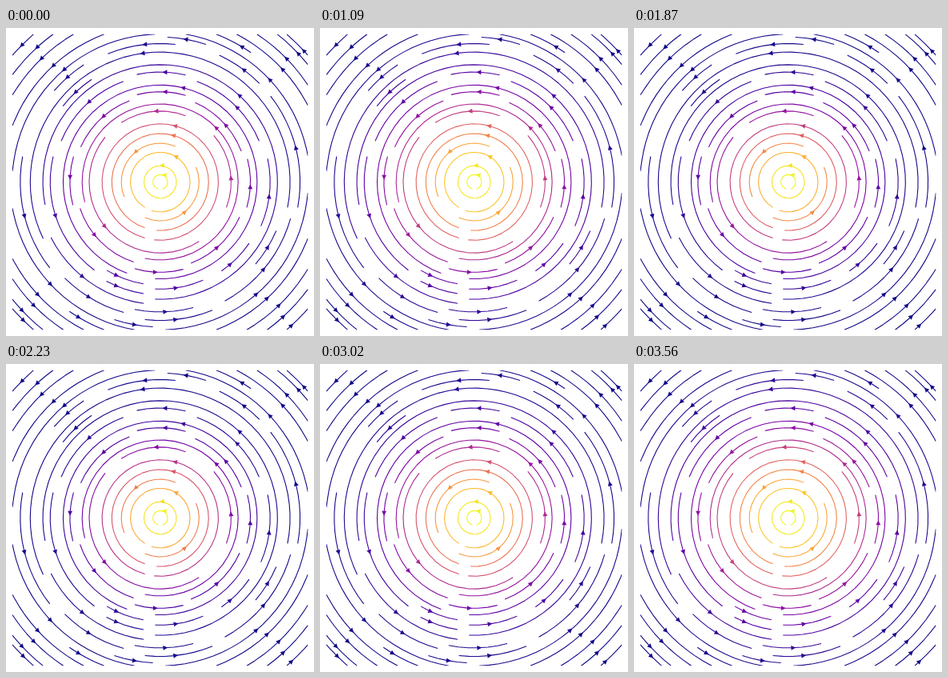
Animation, 385 px wide and 385 px high, one loop 3620 ms. Source, as an HTML page with a canvas:

```html
<!DOCTYPE html>
<html>
<head>
<meta charset="utf-8">
<title>Vortex streamlines</title>
<style>
html, body { margin: 0; width: 100%; height: 100%; overflow: hidden; background: #fff; }
canvas { display: block; }
</style>
</head>
<body>
<canvas id="stage" width="385" height="385"></canvas>
<script>
const ctx = document.getElementById('stage').getContext('2d');
const LAST = 29, MID = LAST / 2;          // streamline mask has 30 x 30 cells
const LEFT = 8, TOP = 7.8, SIZE = 369.4, SCALE = SIZE / LAST;
const MAX_STEP = 1 / 30, MAX_ERROR = 0.003, MIN_LENGTH = 0.1, MAX_LENGTH = 2;
const LOOP = 3620;
const PLASMA = ['0d0887', '41049d', '6a00a8', '8f0da4', 'b12a90', 'cc4778',
  'e16462', 'f2844b', 'fca636', 'fcce25', 'f0f921']
  .map(hex => [0, 2, 4].map(i => parseInt(hex.slice(i, i + 2), 16)));

const taken = new Set();
const cellOf = (x, y) => Math.round(y) * 30 + Math.round(x);
const inside = (x, y) => x >= 0 && x <= LAST && y >= 0 && y <= LAST;

function direction(x, y, sign) {
  const dx = x - MID, dy = y - MID, r = Math.hypot(dx, dy);
  return [-dy / r * sign, dx / r * sign];
}

// Distance, in axes widths, to the border along one axis.
function reach(pos, slope) {
  if (!slope) return Infinity;
  return (slope < 0 ? pos / -slope : (LAST - pos) / slope) / LAST;
}

// Adaptive Heun integration until a taken cell or the border is met.
function walk(x, y, sign, cells) {
  const points = [];
  let step = MAX_STEP, length = 0, current = cellOf(x, y);
  for (;;) {
    points.push([x, y]);
    const [ax, ay] = direction(x, y, sign);
    const px = x + step * LAST * ax, py = y + step * LAST * ay;
    if (!inside(px, py)) {
      const rest = Math.min(reach(x, ax), reach(y, ay));
      points.push([x + rest * LAST * ax, y + rest * LAST * ay]);
      length += rest;
      break;
    }
    const [bx, by] = direction(px, py, sign);
    const error = step / 2 * Math.hypot(bx - ax, by - ay);
    if (error < MAX_ERROR) {
      x += step * LAST * (ax + bx) / 2;
      y += step * LAST * (ay + by) / 2;
      if (!inside(x, y)) break;
      const cell = cellOf(x, y);
      if (cell !== current) {
        if (taken.has(cell)) break;
        taken.add(cell);
        cells.push(cell);
        current = cell;
      }
      if (length + step > MAX_LENGTH) break;
      length += step;
    }
    step = error ? Math.min(MAX_STEP, 0.85 * step * Math.sqrt(MAX_ERROR / error)) : MAX_STEP;
  }
  return { points, length };
}

function trace(x, y) {
  const cells = [cellOf(x, y)];
  taken.add(cells[0]);
  const back = walk(x, y, -1, cells), ahead = walk(x, y, 1, cells);
  if (back.length + ahead.length > MIN_LENGTH) {
    return back.points.reverse().concat(ahead.points.slice(1));
  }
  cells.forEach(cell => taken.delete(cell));
  return null;
}

// Seed cells spiral inwards from the lower left corner.
function* seeds() {
  let x = 0, y = 0, x0 = 0, y0 = 1, x1 = LAST, y1 = LAST, heading = 0;
  for (let i = 0; i < 900; i++) {
    if (x < LAST) yield [x, y];           // the right border starts no lines
    if (heading === 0) { if (++x >= x1) { x1--; heading = 1; } }
    else if (heading === 1) { if (++y >= y1) { y1--; heading = 2; } }
    else if (heading === 2) { if (--x <= x0) { x0++; heading = 3; } }
    else if (--y <= y0) { y0++; heading = 0; }
  }
}

function arrowAt(points) {
  const sums = [];
  let total = 0;
  for (let i = 1; i < points.length; i++) {
    total += Math.hypot(points[i][0] - points[i - 1][0], points[i][1] - points[i - 1][1]);
    sums.push(total);
  }
  const n = sums.findIndex(s => s >= total / 2);
  const [ax, ay] = points[n], [bx, by] = points[n + 1];
  const d = Math.hypot(bx - ax, by - ay), ux = (bx - ax) / d, uy = (by - ay) / d;
  const tipX = (ax + bx) / 2 - 1.4 * ux, tipY = (ay + by) / 2 - 1.4 * uy;
  const baseX = tipX - 5.9 * ux, baseY = tipY - 5.9 * uy;
  const arrow = new Path2D();
  arrow.moveTo(tipX, tipY);
  arrow.lineTo(baseX - 2.95 * uy, baseY + 2.95 * ux);
  arrow.lineTo(baseX + 2.95 * uy, baseY - 2.95 * ux);
  arrow.closePath();
  return arrow;
}

const streams = [];
for (const [x, y] of seeds()) {
  if (taken.has(cellOf(x, y))) continue;
  const route = trace(x, y);
  if (!route) continue;
  const points = route.map(([px, py]) => [LEFT + px * SCALE, TOP + SIZE - py * SCALE]);
  const line = new Path2D();
  points.forEach(p => line.lineTo(...p));
  const r = Math.hypot(x - MID, y - MID) * SCALE;
  streams.push({ line, arrow: arrowAt(points), r2: r * r });
}

function plasma(value) {
  const pos = Math.max(0, Math.min(1, value)) * 10, i = Math.min(9, Math.floor(pos));
  return `rgb(${PLASMA[i].map((c, j) => Math.round(c + (PLASMA[i + 1][j] - c) * (pos - i)))})`;
}

function draw() {
  const t = performance.now() % LOOP;
  const tick = Math.floor((t - 10 * (t >= 850) - 10 * (t >= 2360)) / 60);
  const spread = 8500 * (1 + 0.27 * Math.sin(2 * Math.PI * tick / 50));
  ctx.fillStyle = '#fff';
  ctx.fillRect(0, 0, 385, 385);
  ctx.save();
  ctx.beginPath();
  ctx.rect(LEFT, TOP, SIZE, SIZE);
  ctx.clip();
  ctx.lineWidth = 1.1;
  ctx.lineJoin = 'round';
  for (const { line, arrow, r2 } of streams) {
    ctx.strokeStyle = ctx.fillStyle = plasma(Math.exp(-r2 / spread));
    ctx.stroke(line);
    ctx.fill(arrow);
  }
  ctx.restore();
  requestAnimationFrame(draw);
}
draw();
</script>
</body>
</html>
```
